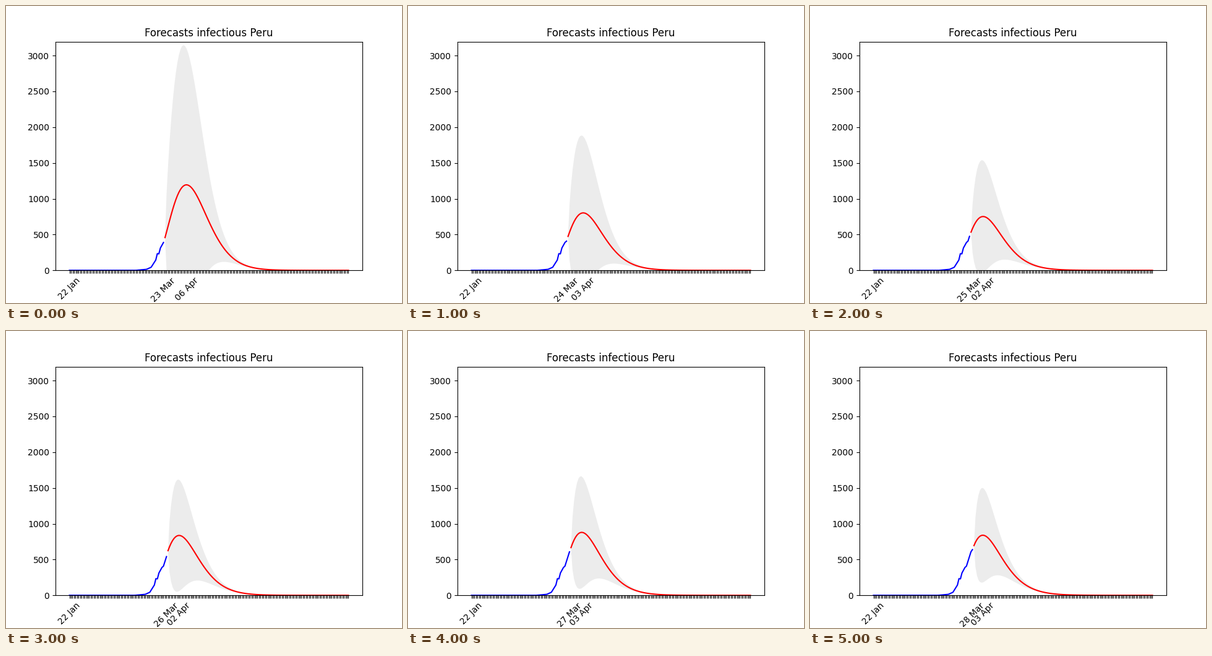
A matplotlib script for the animation above (6 s loop, 640 by 480 pixels).

```python
import numpy as np
import matplotlib.pyplot as plt
from matplotlib.animation import FuncAnimation

HORIZON = 120          # days forecast
FIRST_KNOWN = 62       # days observed at the first step

# one value per step: forecast peak, days until it, half-width of the band
PEAK = (1195, 803, 752, 837, 880, 840)
PEAK_DAY = (13.9, 9.9, 7.9, 7.3, 7.1, 5.9)
SPREAD = (1972, 1087, 790, 783, 786, 662)

# observed infectious: turning points, straight in between
KNOTS = ((43, 0), (50, 14), (53, 43), (56, 144), (57, 233), (58, 230),
         (59, 312), (61, 389), (62, 408), (65, 608), (66, 639))
OBSERVED = np.interp(np.arange(FIRST_KNOWN + len(PEAK)), *zip(*KNOTS))


def day_name(day):
    day += 22
    for month, length in (("Jan", 31), ("Feb", 29), ("Mar", 31)):
        if day <= length:
            return f"{day:02d} {month}"
        day -= length
    return f"{day:02d} Apr"


def hump(u, rise, fall=1.0):
    """Skewed bump of height 1 at u = 1."""
    return u**rise * np.exp(rise / fall * (1 - u**fall))


def forecast(peak, day, spread):
    """Mean curve and half-width; a later peak makes both broader."""
    t = np.arange(HORIZON)
    scale = 20 + 1.65 * (day - 7)
    mean = peak * hump(1 + (t - day) / scale, 0.3 * scale - 2.66)
    half = spread * hump(t / (0.72 * day + 1.2), 0.7, 0.09 * day + 0.57)
    return mean, half


fig, ax = plt.subplots(figsize=(6.4, 4.8), dpi=100)


def draw(i):
    ax.clear()
    known = FIRST_KNOWN + i
    last = known + HORIZON - 1
    mean, half = forecast(PEAK[i], PEAK_DAY[i], SPREAD[i])
    days = np.arange(known, last + 1)
    top = known + int(np.argmax(mean))

    ax.fill_between(days, mean - half, mean + half, facecolor="#ececec",
                    linewidth=0)
    ax.plot(np.arange(known), OBSERVED[:known], color="blue")
    ax.plot(days, mean, color="red")

    labels = [""] * (last + 1)
    labels[0] = day_name(0)
    labels[known - 1] = day_name(known - 1)
    labels[top] = day_name(top - 1)  # forecast dates begin on the last known day
    ax.set_xticks(range(last + 1), labels, rotation=45)
    ax.set_xlim(-0.05 * last, 1.05 * last)
    ax.set_ylim(0, 3195)
    ax.set_title("Forecasts infectious Peru")
    return []


anim = FuncAnimation(fig, draw, frames=len(PEAK), init_func=lambda: draw(0),
                     interval=1000, repeat=True, repeat_delay=0)
plt.show()
```
